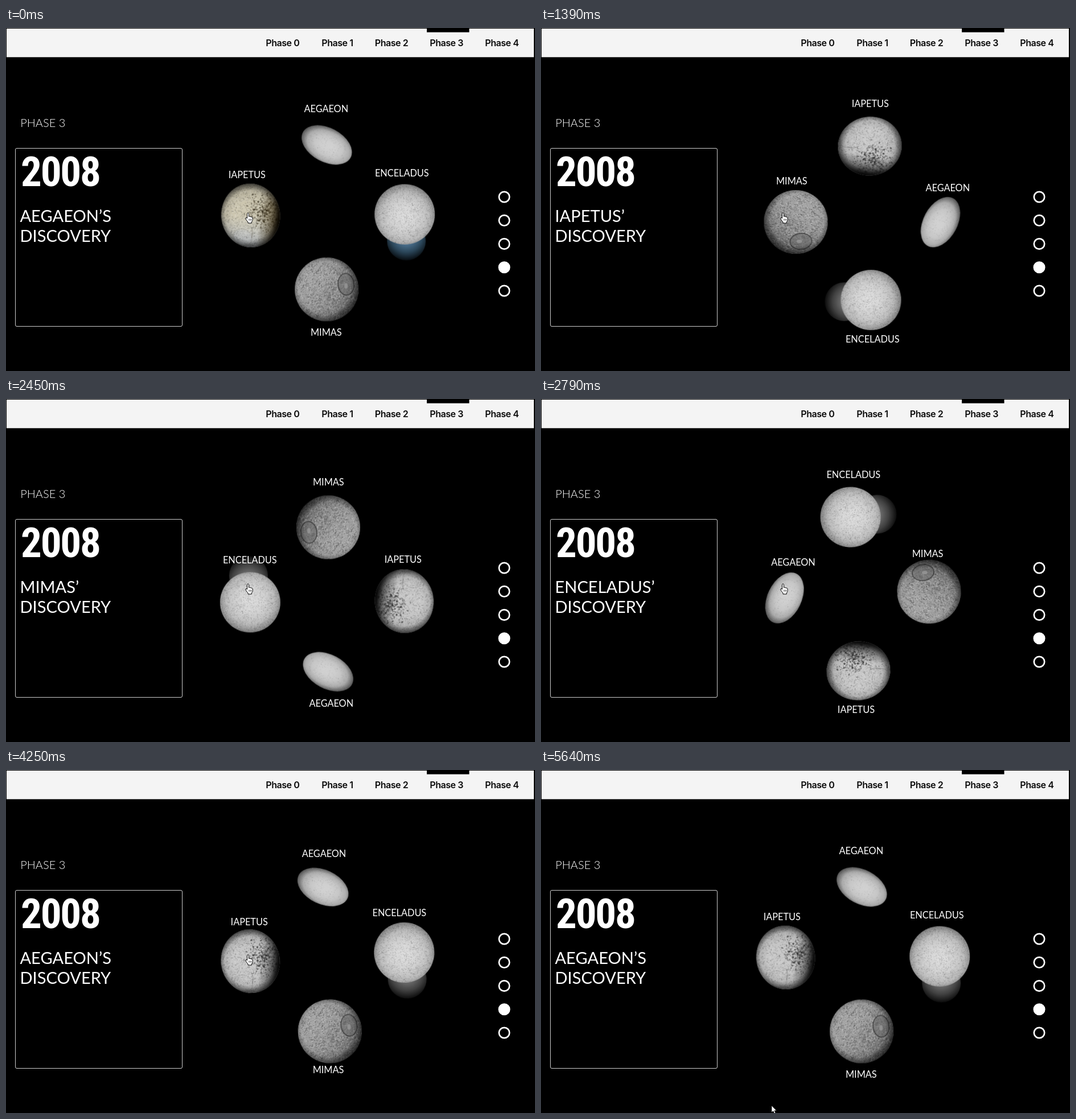
An HTML page with a canvas that plays this animation: 929 px wide and 603 px high, repeating every 6770 ms.

```html
<!DOCTYPE html>
<html lang="en">
<head>
<meta charset="utf-8">
<title>Phase 3</title>
<style>
  html, body { margin: 0; width: 100%; height: 100%; overflow: hidden; background: #000; }
  #stage { position: absolute; left: 0; top: 0; width: 929px; height: 603px; overflow: hidden; background: #000; }
  svg { position: absolute; left: 0; top: 0; }
  canvas { position: absolute; left: -90px; top: -90px; will-change: transform; }
  text { fill: #fff; font-family: Lato, sans-serif; }
  .nav text { fill: #0a0a0a; font: 600 16px Inter, sans-serif; letter-spacing: -.45px; }
  .phase { font-size: 20px; font-weight: 300; }
  .year { font: 700 73px "Roboto Condensed", Roboto, "Open Sans", sans-serif; font-stretch: condensed; letter-spacing: -2.3px; }
  .title { font-size: 29.1px; }
  .label { font-size: 16.3px; text-anchor: middle; }
</style>
</head>
<body>
<div id="stage">
  <div id="moons"></div>
  <svg id="ui" width="929" height="603" viewBox="0 0 929 603">
    <rect x="1" y="1" width="926" height="50.3" fill="#f4f4f4"/>
    <rect x="739" y="0" width="74.5" height="7.5"/>
    <g class="nav" id="nav"></g>
    <text class="phase" x="25.2" y="173.5">PHASE 3</text>
    <rect x="16.5" y="211.5" width="293" height="313" rx="2.5" fill="none" stroke="#fff" stroke-opacity=".8"/>
    <text class="year" x="26" y="278">2008</text>
    <g id="titles"></g>
    <text class="title" x="24.4" y="376">DISCOVERY</text>
    <g id="dots" stroke="#fff" stroke-width="2.7"></g>
    <g id="labels"></g>
    <g id="hand" fill="#fff" stroke="#000" stroke-width="1" stroke-linejoin="round">
      <path d="M3.5 10V2Q3.6.5 5 .5Q6.3.5 6.4 2V7Q7.7 5.9 8.8 7.4Q10.2 6.6 11 8Q12.6 7.5 13 9V13Q12.8 15 11.3 16.5V18.5H5V16.5Q2.5 14 .8 11Q.4 9 2 9Z"/>
      <path d="M6.7 11V14M8.6 11V14M10.5 11V14" stroke-width=".7"/>
    </g>
    <path id="arrow" d="M0 0V12L2.8 9.5L4.8 14L6.8 13.1L4.9 8.8H8.5Z" fill="#fff" stroke="#000" stroke-width=".6"/>
  </svg>
</div>
<script>
const LOOP = 6770, TAU = Math.PI * 2;
const CENTER = { x: 564.5, y: 342.5 };
const $ = id => document.getElementById(id);

// Each name owns an orbit and four resting label places, one per quarter turn.
const moons = [
  { name: 'AEGAEON', title: 'AEGAEON’S', angle: -90.5, radius: 137, paint: paintAegaeon,
    spots: [[562, 142], [714, 281], [571, 535], [439, 280]] },
  { name: 'IAPETUS', title: 'IAPETUS’', angle: 185.5, radius: 135.5, paint: paintIapetus,
    spots: [[423, 258], [578, 133], [697, 282], [549, 553]] },
  { name: 'MIMAS', title: 'MIMAS’', angle: 90.7, radius: 117, paint: paintMimas,
    spots: [[562, 535], [440, 269], [566, 146], [682, 275]] },
  { name: 'ENCELADUS', title: 'ENCELADUS’', angle: -6.3, radius: 136.5, paint: paintEnceladus,
    spots: [[695, 255], [582, 547], [428, 283], [552, 128]] }
];

// The picture only changes at these times.
const ticks = [
  0, 200, 270, 330, 400, 460, 530, 590,
  1260, 1390, 1460, 1520, 1590, 1660, 1720, 1790,
  2320, 2390, 2450, 2520, 2590, 2660, 2720, 2790,
  3790, 3850, 3920, 3990, 4050, 4120, 4190, 4250,
  5380, 5450, 5510, 5580, 5640
];
const settles = [200, 1260, 2320, 3790, 5380];
const turnStarts = [262, 1466, 2466, 3928];
const TURN_MS = 360;

function random(seed) {
  return () => {
    seed = (seed + 0x6D2B79F5) | 0;
    let n = Math.imul(seed ^ (seed >>> 15), 1 | seed);
    n = (n + Math.imul(n ^ (n >>> 7), 61 | n)) ^ n;
    return ((n ^ (n >>> 14)) >>> 0) / 4294967296;
  };
}

function oval(c, x, y, rx, ry = rx, turn = 0) {
  c.beginPath();
  c.ellipse(x, y, rx, ry, turn, 0, TAU);
}

function addStops(gradient, colors) {
  colors.forEach((color, i) => gradient.addColorStop(i / (colors.length - 1), color));
  return gradient;
}
const radial = (c, x, y, r, ...colors) => addStops(c.createRadialGradient(x, y, 0, x, y, r), colors);
const linear = (c, x0, y0, x1, y1, ...colors) => addStops(c.createLinearGradient(x0, y0, x1, y1), colors);

function cover(c, fill) {
  c.fillStyle = fill;
  c.fillRect(-60, -60, 120, 120);
}

function grain(c, rnd, count, size, alpha) {
  for (let i = 0; i < count; i++) {
    c.fillStyle = `rgba(${rnd() < .5 ? '0,0,0' : '255,255,255'},${rnd() * alpha})`;
    c.fillRect(rnd() * 120 - 60, rnd() * 120 - 60, size, size);
  }
}

function paintAegaeon(c, rnd) {
  const tilt = 28 * Math.PI / 180;
  oval(c, 0, 0, 47.5, 30, tilt);
  c.clip();
  c.save();
  c.rotate(tilt);
  c.scale(1, 30 / 47.5);
  cover(c, radial(c, 4, 2, 53, '#d2d2d2', '#cfcfcf', '#c6c6c6', '#acacac', '#4c4c4c'));
  c.restore();
  grain(c, rnd, 2200, 1, .16);
}

function paintIapetus(c, rnd) {
  oval(c, 0, 0, 51.5, 56, -.12);
  c.clip();
  cover(c, linear(c, 0, -56, 0, 56, '#c9c3ac', '#cec8b2', '#bfc4c8'));
  grain(c, rnd, 4500, 1.3, .3);
  for (let i = 0; i < 420; i++) {
    const x = 29 + (rnd() + rnd() + rnd() - 1.5) * 32;
    const y = -9 + (rnd() + rnd() + rnd() - 1.5) * 32;
    c.fillStyle = `rgba(43,35,18,${.15 + rnd() * .5})`;
    oval(c, x, y, .5 + rnd() * 1.8, .4 + rnd() * 1.2, rnd() * 3);
    c.fill();
  }
  c.fillStyle = 'rgba(210,217,225,.18)';
  oval(c, -14, 38, 17, 14, .4);
  c.fill();
  c.strokeStyle = 'rgba(70,65,52,.25)';
  c.stroke();
  c.strokeStyle = 'rgba(70,65,52,.45)';
  c.beginPath();
  c.moveTo(0, 19);
  c.quadraticCurveTo(6, 29, 1, 40);
  c.stroke();
  cover(c, linear(c, 17, -5, 51, 0, 'rgba(56,42,12,0)', 'rgba(56,42,12,.4)', 'rgba(20,14,2,1)'));
  cover(c, radial(c, -1, 0, 58, 'transparent', 'transparent', 'transparent', 'rgba(0,0,0,.1)', 'rgba(0,0,0,.8)'));
}

function crater(c, x, y, r) {
  oval(c, x, y, r, r * .85);
  c.fillStyle = 'rgba(65,65,65,.15)';
  c.fill();
  c.lineWidth = .8;
  c.strokeStyle = 'rgba(45,45,45,.45)';
  c.beginPath();
  c.arc(x, y, r, 2.5, 5.2);
  c.stroke();
  c.strokeStyle = 'rgba(235,235,235,.5)';
  c.beginPath();
  c.arc(x, y, r, -.6, 2);
  c.stroke();
}

function paintMimas(c, rnd) {
  oval(c, 0, 0, 56);
  c.clip();
  cover(c, linear(c, -50, -22, 46, 42, '#a8a8a8', '#a0a0a0', '#8c8c8c', '#606060'));
  grain(c, rnd, 5000, 1.3, .34);
  for (let i = 0; i < 150; i++) {
    crater(c, rnd() * 110 - 55, rnd() * 110 - 55, .7 + rnd() * rnd() * 4);
  }
  oval(c, 34, -9, 14, 19, -.1);
  c.fillStyle = 'rgba(105,105,105,.5)';
  c.fill();
  c.lineWidth = 1.6;
  c.strokeStyle = 'rgba(50,50,50,.75)';
  c.stroke();
  oval(c, 34, -6, 3, 5);
  c.fillStyle = '#959595';
  c.fill();
  cover(c, radial(c, -4, -3, 61, 'transparent', 'transparent', 'transparent', 'rgba(0,0,0,.05)', 'rgba(0,0,0,.65)'));
}

function paintEnceladus(c, rnd) {
  oval(c, 3, 47, 34);
  c.fillStyle = radial(c, 3, 38, 43, '#5d87a6', '#4b708e', '#2b4659', '#080d11');
  c.fill();
  oval(c, 0, 0, 53);
  c.clip();
  cover(c, radial(c, 0, 4, 57, '#dcdcdc', '#d8d8d8', '#cecece', '#bababa', '#7c7c7c'));
  grain(c, rnd, 5000, 1.2, .22);
  c.strokeStyle = 'rgba(90,90,90,.28)';
  c.lineWidth = .8;
  for (let i = 0; i < 22; i++) {
    const start = rnd() * TAU;
    c.beginPath();
    c.arc(rnd() * 80 - 40, rnd() * 80 - 40, 8 + rnd() * 22, start, start + .4 + rnd());
    c.stroke();
  }
}

function add(parent, tag, attrs, content = '') {
  const el = document.createElementNS('http://www.w3.org/2000/svg', tag);
  for (const key in attrs) el.setAttribute(key, attrs[key]);
  el.textContent = content;
  return parent.appendChild(el);
}

[456.3, 554.3, 647.8, 744.3, 841.3].forEach((x, i) => add($('nav'), 'text', { x, y: 31.8 }, 'Phase ' + i));
[297, 338.3, 379.5, 420.8, 462].forEach((cy, i) =>
  add($('dots'), 'circle', { cx: 875, cy, r: 9.2, fill: i === 3 ? '#fff' : 'none' }));

moons.forEach((moon, i) => {
  const canvas = moon.canvas = document.createElement('canvas');
  canvas.width = canvas.height = 180;
  const c = canvas.getContext('2d');
  c.translate(90, 90);
  moon.paint(c, random(11 + i * 7));
  $('moons').append(canvas);
  moon.labelEl = add($('labels'), 'text', { class: 'label' }, moon.name);
  moon.titleEl = add($('titles'), 'text', { class: 'title', x: 24.4, y: 341 }, moon.title);
});

const ease = u => {
  u = Math.min(1, Math.max(0, u));
  return u * u * (3 - 2 * u);
};

// Quarter turns completed, 0 to 4.
function turnsAt(t) {
  const begun = settles.filter(s => s <= t).length;
  if (!begun) return 0;
  if (begun > turnStarts.length) return 4;
  return begun - 1 + ease((t - turnStarts[begun - 1]) / TURN_MS);
}

// Pointer leaves the moon and drops to the bottom edge.
const exits = [
  [5380, 425, 346], [5450, 421, 400], [5510, 415, 480], [5580, 409, 554], [5640, 405, 590]
];

function drawPointer(t) {
  const spot = exits.filter(e => e[0] <= t).pop();
  const onMoon = !spot || spot[2] < 385;
  const [, x, y] = spot || [0, 427, 334];
  $('hand').style.display = onMoon ? '' : 'none';
  $('arrow').style.display = onMoon ? 'none' : '';
  $('hand').setAttribute('transform', `translate(${x - 7} ${y - 9.5})`);
  $('arrow').setAttribute('transform', `translate(${x} ${y})`);
}

function draw(t) {
  const turns = turnsAt(t), from = Math.floor(turns) % 4, to = (from + 1) % 4, p = turns % 1;
  $('moons').style.filter = t < 200 ? 'none' : 'grayscale(1)';
  moons.forEach((moon, i) => {
    const a = (moon.angle + turns * 90) * Math.PI / 180;
    const x = CENTER.x + moon.radius * Math.cos(a), y = CENTER.y + moon.radius * Math.sin(a);
    moon.canvas.style.transform = `translate(${x}px,${y}px) rotate(${turns * 90}deg)`;
    const mix = k => moon.spots[from][k] + (moon.spots[to][k] - moon.spots[from][k]) * p;
    moon.labelEl.setAttribute('x', mix(0) + .3);
    moon.labelEl.setAttribute('y', mix(1) + 6.3);
    // A nearly finished fade counts as done.
    const shown = p > .95 ? 1 : p;
    moon.titleEl.setAttribute('opacity', i === from ? 1 - shown : i === to ? shown : 0);
  });
  drawPointer(t);
}

let last = -1;
const origin = performance.now();
function tick() {
  const now = Math.max(0, performance.now() - origin) % LOOP;
  const t = ticks.filter(s => s <= now).pop();
  if (t !== last) draw(last = t);
  requestAnimationFrame(tick);
}
tick();
</script>
</body>
</html>
```
